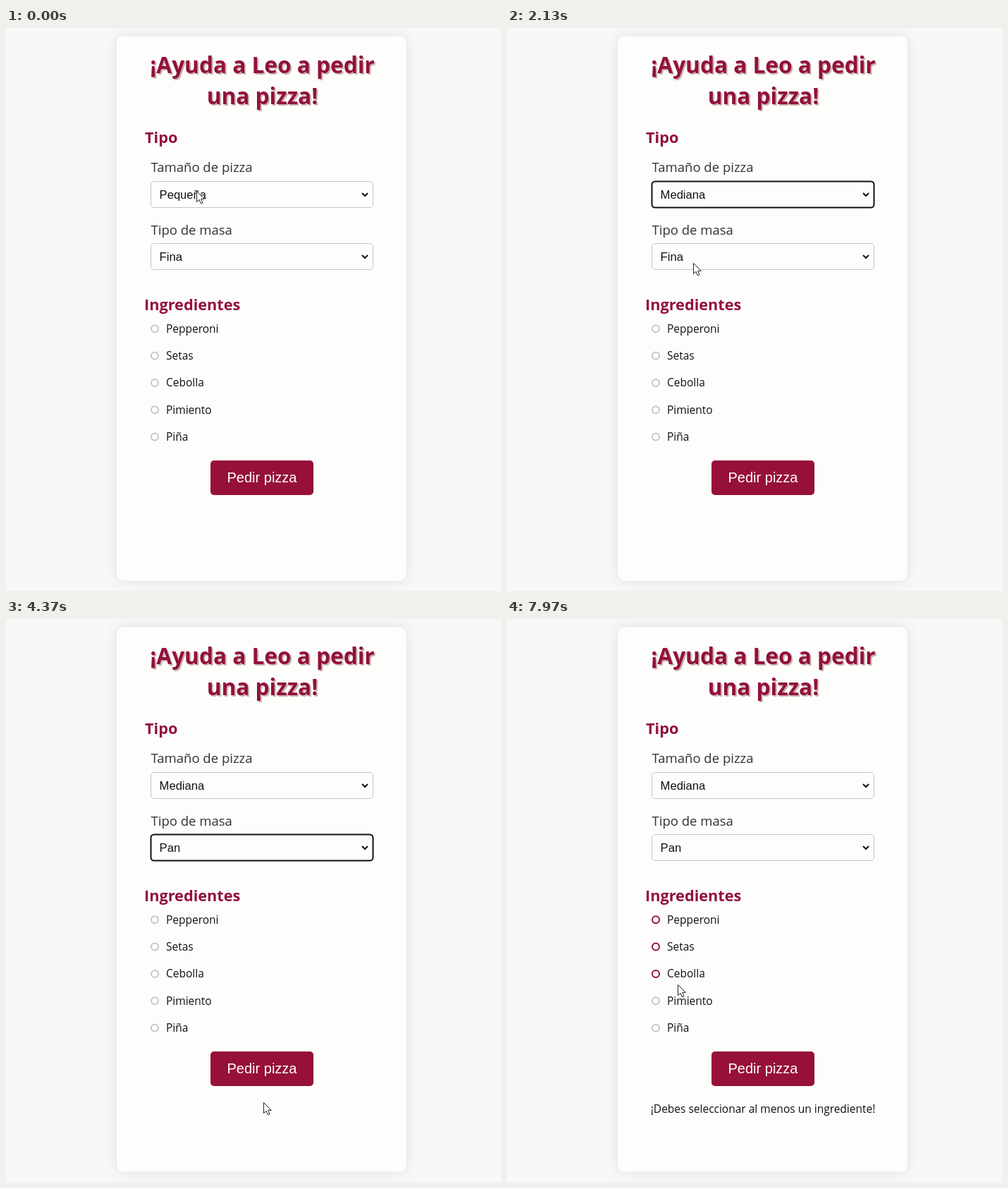
These frames come from a looping animation (702 px wide and 798 px high, 8000 ms). An HTML page:

```html
<!DOCTYPE html>
<html lang="es">
<head>
<meta charset="utf-8">
<title>Pedir pizza</title>
<style>
  html, body { margin: 0; width: 100%; height: 100%; overflow: hidden; background: #f8f8f8; }
  svg { display: block; width: 702px; height: 798px; font-family: "Open Sans", "Noto Sans", sans-serif; }
  .card { fill: #fdfdfc; filter: drop-shadow(0 0 9px rgba(50, 50, 110, .12)); }
  .title { font-size: 31.6px; font-weight: 700; fill: #92103c; text-anchor: middle; text-shadow: 2px 2px 1px #c8afa8; }
  .heading { font-size: 21.7px; font-weight: 700; fill: #92103c; }
  .label { font-size: 18.5px; fill: #333; }
  .item { font-size: 15.5px; fill: #111; }
  .control { font: 16.6px "Liberation Sans", Arial, sans-serif; fill: #111; }
  .box { fill: #fdfdfd; stroke: #c6c6ca; }
  .box.focus { stroke: #111; stroke-width: 2; }
  .chevron { fill: none; stroke: #111; stroke-width: 2; }
  .radio { fill: #fefefe; stroke: #c6c6c4; stroke-width: 2; }
  .radio.on { stroke: #92103c; }
  .button { fill: #96103a; }
  .button-text { font: 20px "Liberation Sans", Arial, sans-serif; fill: #fff; text-anchor: middle; }
  .shadow { filter: drop-shadow(0 17px 20px rgba(0, 0, 20, .27)); }
  .frame { fill: none; stroke: #96969c; }
  .menu .row { fill: #fdfdfd; }
  .menu .active .row { fill: #2492f6; }
  .menu .active .control { fill: #fff; }
</style>
</head>
<body>
<svg viewBox="0 0 702 798">
  <defs>
    <clipPath id="outside">
      <path clip-rule="evenodd" d="M0-300H702V700H0Z M206 0H520V62.5H206Z"/>
    </clipPath>
    <clipPath id="inside"><rect x="206" width="314" height="62.5" rx="7"/></clipPath>
  </defs>
  <rect class="card" x="157" y="11.5" width="411" height="772" rx="10"/>
  <text class="title" x="363.5" y="64">¡Ayuda a Leo a pedir</text>
  <text class="title" x="363.5" y="108">una pizza!</text>
  <text class="heading" x="197" y="163">Tipo</text>
  <text class="label" x="205.5" y="204">Tamaño de pizza</text>
  <text class="label" x="205.5" y="292.5">Tipo de masa</text>
  <text class="heading" x="196" y="400">Ingredientes</text>
  <g id="selects"></g>
  <g id="items"></g>
  <rect class="button" x="290" y="613" width="146" height="49" rx="5"/>
  <text class="button-text" x="363" y="644">Pedir pizza</text>
  <text class="item" id="message" x="363" y="700" text-anchor="middle">¡Debes seleccionar al menos un ingrediente!</text>
  <g id="menus"></g>
  <path id="cursor" d="M.5.5V15.6L4 12.3 6.4 17.8 9 16.7 6.6 11.3H11.3Z" fill="#fff" stroke="#222" stroke-linejoin="round"/>
</svg>
<script>
const DURATION = 8000;
const ROW = 20.5;
const OPENING = 85;
const $ = id => document.getElementById(id);

const selects = [
  { y: 217, options: ['Pequeña', 'Mediana', 'Grande'], open: 870, close: 1850, blur: 2360, picked: 1 },
  { y: 305, options: ['Fina', 'Gruesa', 'Pan'], open: 2360, close: 3480, blur: 4750, picked: 2 },
];
const items = [
  ['Pepperoni', 5960], ['Setas', 6680], ['Cebolla', 7420], ['Pimiento', Infinity], ['Piña', Infinity],
];
const MESSAGE_AT = 4860;

// time, x, y of the pointer tip
const pointer = [
  [0, 270, 231], [1050, 270, 231], [1500, 268, 284], [1880, 268, 284],
  [2130, 264, 333], [2370, 266, 331], [2600, 273, 388], [3550, 273, 388],
  [4250, 365, 685], [4400, 365, 685], [4700, 363, 641], [4950, 363, 641],
  [5650, 267, 418], [6100, 264, 422], [6500, 256, 460], [6850, 255, 462],
  [7250, 246, 499], [7600, 246, 500], [7900, 242, 518], [8000, 242, 518],
];

$('selects').innerHTML = selects.map(({ y }) => `
  <rect class="box" x="205.5" y="${y + .5}" width="315" height="37" rx="4.5"/>
  <text class="control value" x="217.6" y="${y + 25}"></text>
  <path class="chevron" d="M505 ${y + 17}l4 4 4-4"/>`).join('');

$('items').innerHTML = items.map(([name], i) => {
  const y = 426.3 + i * 38.3;
  return `<circle class="radio" cx="211" cy="${y}" r="5"/>
    <text class="item" x="227" y="${y + 5.5}">${name}</text>`;
}).join('');

$('menus').innerHTML = selects.map(({ y, options }) => `
  <g class="menu" transform="translate(0 ${y + 38})">
    <g clip-path="url(#outside)"><rect class="shadow" x="206" width="314" height="62.5" rx="7"/></g>
    <g class="list" clip-path="url(#inside)">${options.map((name, i) => `
      <g class="option">
        <rect class="row" x="206" y="${i * ROW}" width="314" height="${ROW + 1}"/>
        <text class="control" x="218.5" y="${i * ROW + 15}">${name}</text>
      </g>`).join('')}
    </g>
    <rect class="frame" x="206.5" y=".5" width="313" height="62" rx="7"/>
  </g>`).join('');

const all = (selector, root = document) => [...root.querySelectorAll(selector)];
const boxes = all('.box'), values = all('.value'), radios = all('.radio'), menus = all('.menu');
const show = (el, on) => el.setAttribute('visibility', on ? 'inherit' : 'hidden');

function pointerAt(t) {
  const next = Math.max(1, pointer.findIndex(([time]) => time > t));
  const [t0, x0, y0] = pointer[next - 1], [t1, x1, y1] = pointer[next];
  const p = (t - t0) / (t1 - t0), eased = p * p * (3 - 2 * p);
  return [x0 + (x1 - x0) * eased, y0 + (y1 - y0) * eased];
}

function render(t) {
  const [x, y] = pointerAt(t);
  $('cursor').setAttribute('transform', `translate(${x} ${y})`);

  selects.forEach((s, i) => {
    const isOpen = t >= s.open && t < s.close;
    const hovered = Math.floor((y - s.y - 38) / ROW);
    const active = s.options[hovered] ? hovered : 0;
    values[i].textContent = s.options[t >= s.close ? s.picked : 0];
    boxes[i].classList.toggle('focus', t >= s.close && t < s.blur);
    show(menus[i], isOpen);
    show(menus[i].querySelector('.list'), t >= s.open + OPENING && isOpen);
    all('.option', menus[i]).forEach((el, n) => el.classList.toggle('active', n === active));
  });

  items.forEach(([, checkedAt], i) => radios[i].classList.toggle('on', t >= checkedAt));
  show($('message'), t >= MESSAGE_AT);
}

const start = performance.now();
function tick() {
  render((performance.now() - start) % DURATION);
  requestAnimationFrame(tick);
}
tick();
</script>
</body>
</html>
```
